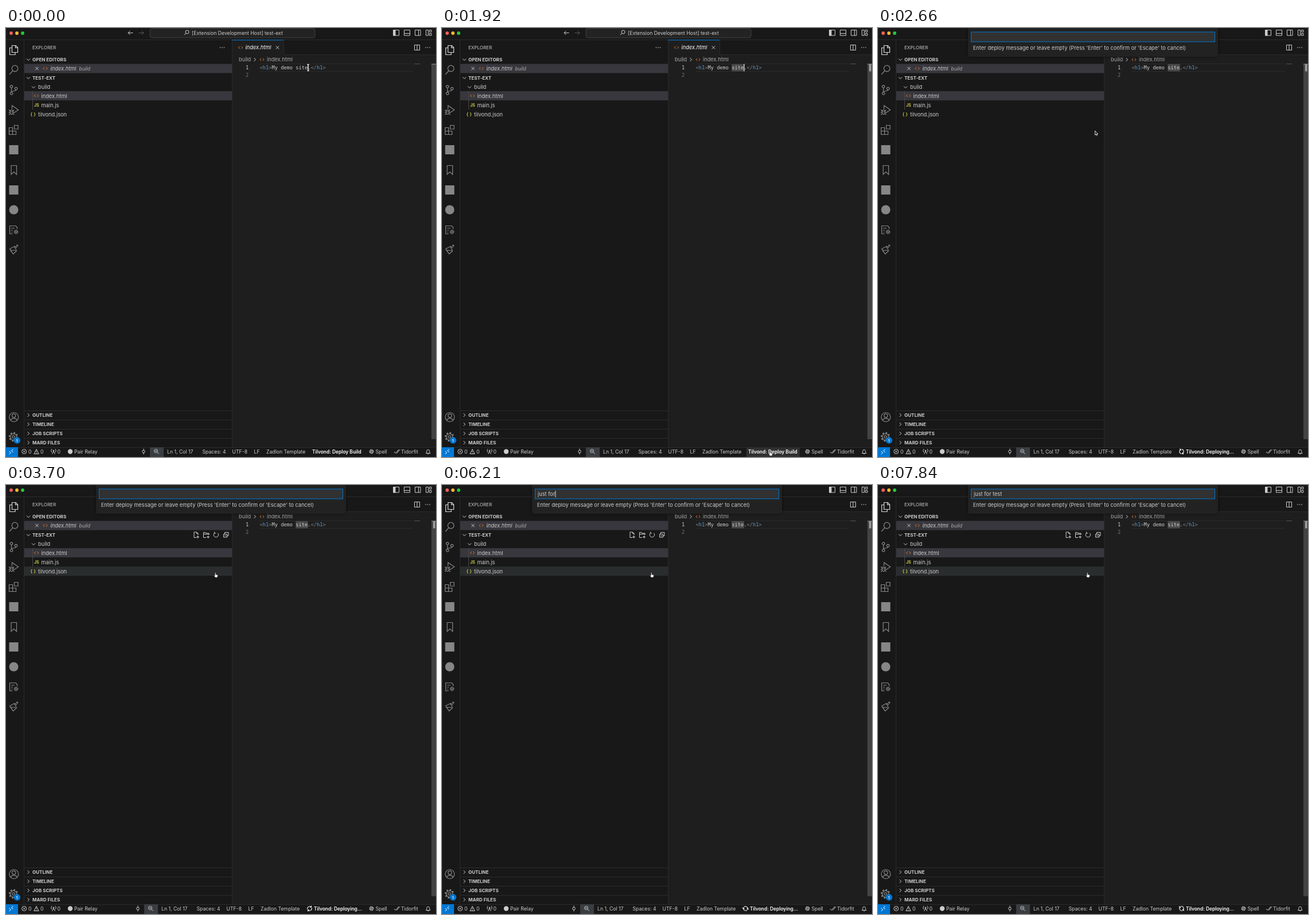
Animation of 750 by 747 pixels, one loop 7.99 s. Source, as an HTML page:

```html
<!DOCTYPE html>
<html lang="en">
<head>
<meta charset="utf-8">
<title>Deploy from the editor</title>
<style>
html, body { margin: 0; width: 100%; height: 100%; overflow: hidden; background: #181818; }
svg { display: block; width: 100vw; height: 100vh; }
text { font: 9.25px Inter, "Open Sans", sans-serif; fill: #ccc; white-space: pre; }
.small text, text.small { font-size: 8.7px; }
.head text, text.head { font-size: 8.05px; }
.head text { font-weight: 700; }
text.strong { font-size: 8.4px; font-weight: 600; fill: #fff; }
text.it { font-style: italic; }
.crumb text { fill: #a9a9a9; }
.mono text { font: 8.7px "DejaVu Sans Mono", monospace; }
.line { fill: none; stroke: #ccc; stroke-width: 1; }
.bar { stroke: #868686; stroke-width: 1.2; }
.edge { fill: none; stroke: #2b2b2b; }
.tag { fill: #569cd6; }
.punct { fill: #808080; }
.html { fill: none; stroke: #e37933; stroke-width: 1; }
#spin { transform-box: fill-box; transform-origin: center; }
</style>
</head>
<body>
<svg viewBox="0 0 750 747" preserveAspectRatio="none">
  <defs>
    <path id="down" class="line" d="M-3-1.5 0 1.5 3-1.5"/>
    <path id="right" class="line" d="M-1.5-3 1.5 0-1.5 3"/>
    <path id="code" class="html" d="M-1.3-2.3-3.6 0-1.3 2.3M1.3-2.3 3.6 0 1.3 2.3"/>
    <path id="close" class="line" d="M-2.7-2.7 2.7 2.7M2.7-2.7-2.7 2.7"/>
    <g id="dots" fill="#ccc"><circle cx="-3.5" r=".8"/><circle r=".8"/><circle cx="3.5" r=".8"/></g>
    <g id="lens" class="line"><circle cx="1" cy="-1" r="3"/><path d="M-1.2 1.2-4.2 4.2"/></g>
    <g id="gear" fill="none">
      <circle r="2.2"/><circle r="5.4"/>
      <circle r="7" stroke-width="2.4" stroke-dasharray="2.75 2.75"/>
    </g>
    <filter id="shade" x="-5%" y="-30%" width="110%" height="180%">
      <feDropShadow dx="0" dy="0" stdDeviation="3" flood-color="#000" flood-opacity=".5"/>
    </filter>
  </defs>

  <rect width="750" height="747" fill="#181818"/>
  <rect x="394" y="46" width="356" height="684" fill="#1e1e1e"/>
  <rect x="394" y="21" width="90" height="26" fill="#1e1e1e"/>
  <path class="edge" d="M0 20.5H750M31.5 21V730M394.5 21V730M484.5 21V46.5H750M0 730.5H750"/>
  <path d="M394 21H484" stroke="#0078d4"/>

  <!-- title bar -->
  <circle cx="9" cy="9" r="2.9" fill="#ff5f57"/>
  <circle cx="19" cy="9" r="2.9" fill="#febc2e"/>
  <circle cx="29" cy="9" r="2.9" fill="#28c840"/>
  <path class="line" d="M221.5 8.5H213M216.5 5 213 8.5 216.5 12"/>
  <path class="line" opacity=".35" d="M231.5 8.5H240M236.5 5 240 8.5 236.5 12"/>
  <rect x="251" y=".5" width="288" height="16.5" rx="4" fill="#232323" stroke="#414141"/>
  <use href="#lens" x="315" y="8"/>
  <text class="small" x="324" y="11.7">[Extension Development Host] test-ext</text>
  <g class="line">
    <path d="M675.5 3.5h10v9.5h-10zM694.5 3.5h10v9.5h-10zM694.5 9.5h10M713.5 3.5h9.5v9.5h-9.5zM719.5 3.5v9.5M732.5 3.5h4v9.5h-4zM738.5 3.5h3.5v3.5h-3.5zM738.5 9.5h3.5v3.5h-3.5z"/>
    <path fill="#ccc" d="M675.5 3.5h3.5v9.5h-3.5z"/>
  </g>

  <!-- activity bar -->
  <g class="line bar">
    <path stroke="#d7d7d7" d="M10.5 30.5h6.5l3.5 3.5v8.5h-10zM16.5 30.5v4h4M10.5 34.5h-4v12h9.5v-4"/>
    <circle cx="15.5" cy="70.5" r="5.3"/><path d="M11.7 74.5 6 81"/>
    <circle cx="9.5" cy="102" r="2.2"/><circle cx="9.5" cy="114" r="2.2"/><circle cx="17.5" cy="105.5" r="2.2"/>
    <path d="M9.5 104.2V111.8M17.5 107.7C17.5 111 10 108.5 9.5 111.5"/>
    <path d="M10.5 141V135L21.5 142.5 14 147.5"/>
    <ellipse cx="9.7" cy="146.5" rx="2.7" ry="3.6"/>
    <path d="M5 142.5 7.5 144.5M14 142.5 12 144.5M4.5 147H7M12.5 147H15M5 151 7.5 149M14.5 151 12 149M7 146H12.5"/>
    <path d="M5.5 173.5h6v6h-6zM5.5 179.5h6v6h-6zM11.5 179.5h6v6h-6zM14.5 169.5h6.5v6.5h-6.5z"/>
    <path d="M9 239.5h9.5v15.5L13.7 250.5 9 255z"/>
    <path d="M11.5 358.5H6.5V344.5H17L19.5 347.5V350M9 348.5H15M9 352H12M9 355.5H11"/>
    <path d="M6.5 384.5 14.5 380.5 18.5 388 12.5 393.5zM15 380 19 383M9 387 17 387.5M7 386 12 393"/>
    <circle cx="19.5" cy="379" r="1.2"/>
    <circle cx="13.7" cy="677.5" r="8"/><circle cx="13.7" cy="675" r="3.1"/>
    <path d="M8.5 683.3C9.5 678.5 18 678.5 19 683.3"/>
    <use href="#gear" transform="translate(17.5 355) scale(.48)" stroke-width="2"/>
    <use href="#gear" x="13" y="712"/>
  </g>
  <g fill="#868686">
    <rect x="5.5" y="204" width="16" height="16"/>
    <rect x="5.5" y="274" width="16" height="16"/>
    <circle cx="13.5" cy="316.5" r="8"/>
  </g>
  <circle cx="19.3" cy="718" r="5.7" fill="#0078d4"/>
  <text x="17.6" y="720.5" style="font-size:6.5px;font-weight:600;fill:#fff">1</text>

  <!-- explorer -->
  <text class="head" x="46" y="37">EXPLORER</text>
  <use href="#dots" x="377" y="34"/>
  <rect x="32" y="62.5" width="362" height="16" fill="#37373d"/>
  <rect x="32" y="110" width="362" height="16" fill="#37373d"/>
  <rect id="rowHover" x="32" y="142" width="362" height="16" fill="#2a2d2e"/>
  <path class="edge" style="stroke:#4a4a4a" d="M46.5 110V142"/>
  <g class="head">
    <text x="46" y="57.8">OPEN EDITORS</text>
    <text x="46" y="89.5">TEST-EXT</text>
    <text x="46" y="677">OUTLINE</text>
    <text x="46" y="693">TIMELINE</text>
    <text x="46" y="709">JOB SCRIPTS</text>
    <text x="46" y="725">MARD FILES</text>
  </g>
  <path class="edge" d="M32 666.5H394M32 682.5H394M32 698.5H394M32 714.5H394"/>
  <use href="#down" x="39" y="55"/><use href="#down" x="39" y="87"/><use href="#down" x="48" y="103"/>
  <use href="#right" x="39" y="674"/><use href="#right" x="39" y="690"/><use href="#right" x="39" y="706"/><use href="#right" x="39" y="722"/>
  <use href="#close" x="54" y="70.5"/>
  <use href="#code" x="68.5" y="70.5"/><use href="#code" x="53" y="118"/>
  <text class="it" x="77.5" y="73.8">index.html</text>
  <text class="it" x="127.5" y="73.8" style="font-size:8.5px;fill:#aaa">build</text>
  <text x="56" y="105.8">build</text>
  <text x="61.5" y="121.5">index.html</text>
  <text x="61.5" y="137.5">main.js</text>
  <text x="56" y="153.5">tilvond.json</text>
  <text x="49" y="136.8" style="font-size:7px;font-weight:700;fill:#cbcb41">JS</text>
  <text x="42.5" y="152.8" style="font-size:8px;font-weight:600;fill:#cbcb41">{ }</text>
  <g id="paneActions" class="line">
    <path d="M332 91.5H328V82H332.5L335 84.5V87M332.5 82V84.5H335M334.5 88V93M332 90.5H337"/>
    <path d="M349 91.5H344.5V82.5H348L349 84H354V87M344.5 85.5H354M352.5 88V93M350 90.5H355"/>
    <path d="M364 83.2A4.2 4.2 0 1 0 369.5 83.8M363.5 81.5V84H366"/>
    <path d="M379.5 85.5h6v5.5h-6zM381.5 85V82.5H388V88.5H386M381 88.3H384"/>
  </g>

  <!-- editor -->
  <use href="#code" x="409" y="34"/>
  <text class="it" x="417.5" y="37.3" style="fill:#fff">index.html</text>
  <use href="#close" x="473.5" y="34"/>
  <path class="line" d="M712.5 29.5h9v9h-9zM717 29.5v9"/>
  <use href="#dots" x="735.5" y="34"/>
  <g class="crumb">
    <text x="406" y="58.2">build</text>
    <use href="#right" x="434" y="55"/>
    <use href="#code" x="446.5" y="55"/>
    <text x="455" y="58.2">index.html</text>
  </g>
  <path class="edge" d="M442 62.5H710M442 75.5H710"/>
  <rect id="word" x="505.3" y="63" width="21.5" height="12.5" fill="#494949"/>
  <g class="mono">
    <text x="418" y="72">1</text>
    <text x="418" y="85" style="fill:#6e7681">2</text>
    <text x="442.5" y="72"><tspan class="punct">&lt;</tspan><tspan class="tag">h1</tspan><tspan class="punct">&gt;</tspan>My demo site.<tspan class="punct">&lt;/</tspan><tspan class="tag">h1</tspan><tspan class="punct">&gt;</tspan></text>
  </g>
  <rect id="caret" x="526.3" y="62.5" width="1.3" height="13" fill="#ddd"/>
  <path d="M712 62.5H722" stroke="#555"/>
  <rect x="742" y="62" width="8" height="654" fill="#434343"/>
  <path d="M742 63H750" stroke="#888"/>
  <rect id="mark" x="745" y="63" width="3.5" height="12.5" fill="#a0a0a0"/>

  <!-- status bar -->
  <rect id="btnHover" x="531" y="731" width="93" height="16" fill="#303030"/>
  <rect id="spellHover" x="629" y="731" width="39" height="16" fill="#303030"/>
  <rect y="730" width="21" height="17" fill="#0078d4"/>
  <path class="line" style="stroke:#fff" d="M5.5 737 8.5 739.5 5.5 742M12.5 733.5 9.5 736 12.5 738.5"/>
  <g class="line">
    <circle cx="31.7" cy="737.5" r="4"/><path d="M30 735.8 33.4 739.2M33.4 735.8 30 739.2"/>
    <path d="M53 733.5 57.2 741.5H48.8zM53 736.5V739M53 740V740.8"/>
    <path d="M83 737 80.5 742M83 737 85.5 742M80 733C78.5 735 78.5 737 80 739M86 733C87.5 735 87.5 737 86 739"/>
    <circle cx="83" cy="736" r="1"/>
    <use href="#gear" transform="translate(637.5 737.5) scale(.5)" stroke-width="2"/>
    <path d="M677 738 679.5 740.5 685 734M681.5 740.5 687 734"/>
    <path d="M732.5 740.5H740L738.7 738.5V736.5A2.5 2.8 0 0 0 733.8 736.5V738.5zM735.3 741.8H737.3"/>
  </g>
  <circle cx="112" cy="737.5" r="4.2" fill="#ccc"/>
  <g class="small">
    <text x="39" y="740.7">0</text><text x="60" y="740.7">0</text><text x="89.5" y="740.7">0</text>
    <text x="119" y="740.7">Pair Relay</text>
    <text x="644.5" y="740.7">Spell</text>
    <text x="689" y="740.7">Tidorfit</text>
    <g id="info">
      <path class="line" d="M240 732.5V735.2M240 739.8V742.5"/><circle class="line" cx="240" cy="737.5" r="2.3"/>
      <rect x="251" y="730" width="24" height="17" fill="#3a3d41"/>
      <use href="#lens" transform="translate(262.5 737.5) scale(-1 1)"/><path class="line" d="M260 736.5H263.2"/>
      <text x="281" y="740.7">Ln 1, Col 17</text>
      <text x="342.5" y="740.7">Spaces: 4</text>
      <text x="394.5" y="740.7">UTF-8</text>
      <text x="432.5" y="740.7">LF</text>
      <text x="454" y="740.7">Zadlon Template</text>
    </g>
  </g>
  <text id="idle" class="strong" x="534" y="740.7">Tilvond: Deploy Build</text>
  <g id="busy">
    <g id="spin" class="line" style="stroke:#fff">
      <circle cx="529.5" cy="737.5" r="4.8" stroke="none"/>
      <path d="M525.7 738.5A4 4 0 0 1 532.5 735M533.3 736.5A4 4 0 0 1 526.5 740M532.8 732.8V735.3H530.3M526.2 742.2V739.7H528.7"/>
    </g>
    <text class="strong" x="537" y="740.7">Tilvond: Deploying...</text>
  </g>

  <!-- message prompt -->
  <g id="prompt">
    <path filter="url(#shade)" fill="#222" d="M157 0H593V46A4 4 0 0 1 589 50H161A4 4 0 0 1 157 46z"/>
    <rect x="162.5" y="7" width="425" height="17" fill="#313131" stroke="#0078d4"/>
    <text id="typed" x="167" y="19"></text>
    <rect id="inputCaret" y="10" width="1" height="11.5" fill="#ddd"/>
    <text x="165.7" y="37.5">Enter deploy message or leave empty (Press 'Enter' to confirm or 'Escape' to cancel)</text>
  </g>

  <g id="pointer">
    <path id="textBar" fill="none" stroke="#e8e8e8" d="M-2-5.5Q0-5.5 0-4.3Q0-5.5 2-5.5M0-4.3V4.3M-2 5.5Q0 5.5 0 4.3Q0 5.5 2 5.5"/>
    <path id="arrow" fill="#111" stroke="#eee" stroke-width=".9" d="M-1.5-4V3.2L.2 1.8 1.3 4.2 2.5 3.6 1.5 1.4H3.6z"/>
    <path id="hand" fill="#fff" stroke="#222" stroke-width=".6" d="M-1.5-4Q-.6-4.8 0-4V-1.2L2.8-.4Q3.5 0 3.3 1.2L2.6 4H-1L-3.2.8Q-3-.2-1.5.6z"/>
  </g>
</svg>
<script>
const LOOP = 7990, STEP = LOOP / 54;
const OPEN = 15;
const MESSAGE = "just for test";
const KEYS = [32, 34, 36, 39, 40, 40, 41, 42, 43, 44, 45, 46, 47];
// step, x, y
const PATH = [
  [2, 527, 69], [3, 529, 75], [4, 545, 140], [5, 580, 270], [6, 622, 420],
  [7, 655, 560], [8, 672, 660], [9, 674, 715], [10, 664, 738], [11, 640, 741],
  [12, 597, 742], [13, 573, 741], [15, 572, 738], [16, 530, 600],
  [17, 430, 330], [18, 380, 183], [19, 371, 166], [20, 367, 158], [21, 366, 157]
];
const $ = id => document.getElementById(id);
const show = (id, on) => { $(id).style.visibility = on ? "visible" : "hidden"; };
const lit = ms => ((ms % 1000) + 1000) % 1000 < 500;

function pointerAt(n) {
  const i = PATH.findIndex(p => p[0] >= n);
  if (i < 0) return PATH[PATH.length - 1].slice(1);
  if (i === 0) return PATH[0].slice(1);
  const [a, ax, ay] = PATH[i - 1], [b, bx, by] = PATH[i];
  const k = (n - a) / (b - a);
  return [ax + (bx - ax) * k, ay + (by - ay) * k];
}

function drawPointer(n) {
  const [x, y] = pointerAt(n);
  const status = y > 730;
  const row = x < 394 && y > 142 && y <= 158;
  const overText = !status && x > 394 && y > 62;
  $("pointer").setAttribute("transform", `translate(${x} ${y})`);
  show("textBar", overText);
  show("hand", status || row);
  show("arrow", !overText && !status && !row);
  show("rowHover", row);
  show("btnHover", status && n < OPEN && x > 531 && x < 624);
  show("spellHover", status && x > 629 && x < 668);
}

function drawPrompt(n) {
  const open = n >= OPEN, t = n * STEP;
  const count = KEYS.filter(k => k <= n).length;
  $("prompt").style.display = open ? "" : "none";
  if (!open) return;
  const typed = $("typed");
  typed.textContent = MESSAGE.slice(0, count);
  $("inputCaret").setAttribute("x", 167 + (count ? typed.getComputedTextLength() : 0));
  $("inputCaret").style.opacity = +lit(count ? t - KEYS[count - 1] * STEP : t);
}

function draw() {
  const n = Math.floor(((performance.now() + 8) % LOOP) / STEP);
  const t = n * STEP, open = n >= OPEN;
  drawPointer(n);
  drawPrompt(n);
  show("word", n >= 1);
  show("mark", n >= 1);
  show("caret", !open && lit(t - 630));
  show("paneActions", n >= 19);
  show("idle", !open);
  show("busy", open);
  $("info").setAttribute("transform", `translate(${open ? -10 : 0} 0)`);
  $("spin").style.transform = `rotate(${(t - OPEN * STEP) * 360 / 1500}deg)`;
  requestAnimationFrame(draw);
}
draw();
</script>
</body>
</html>
```
